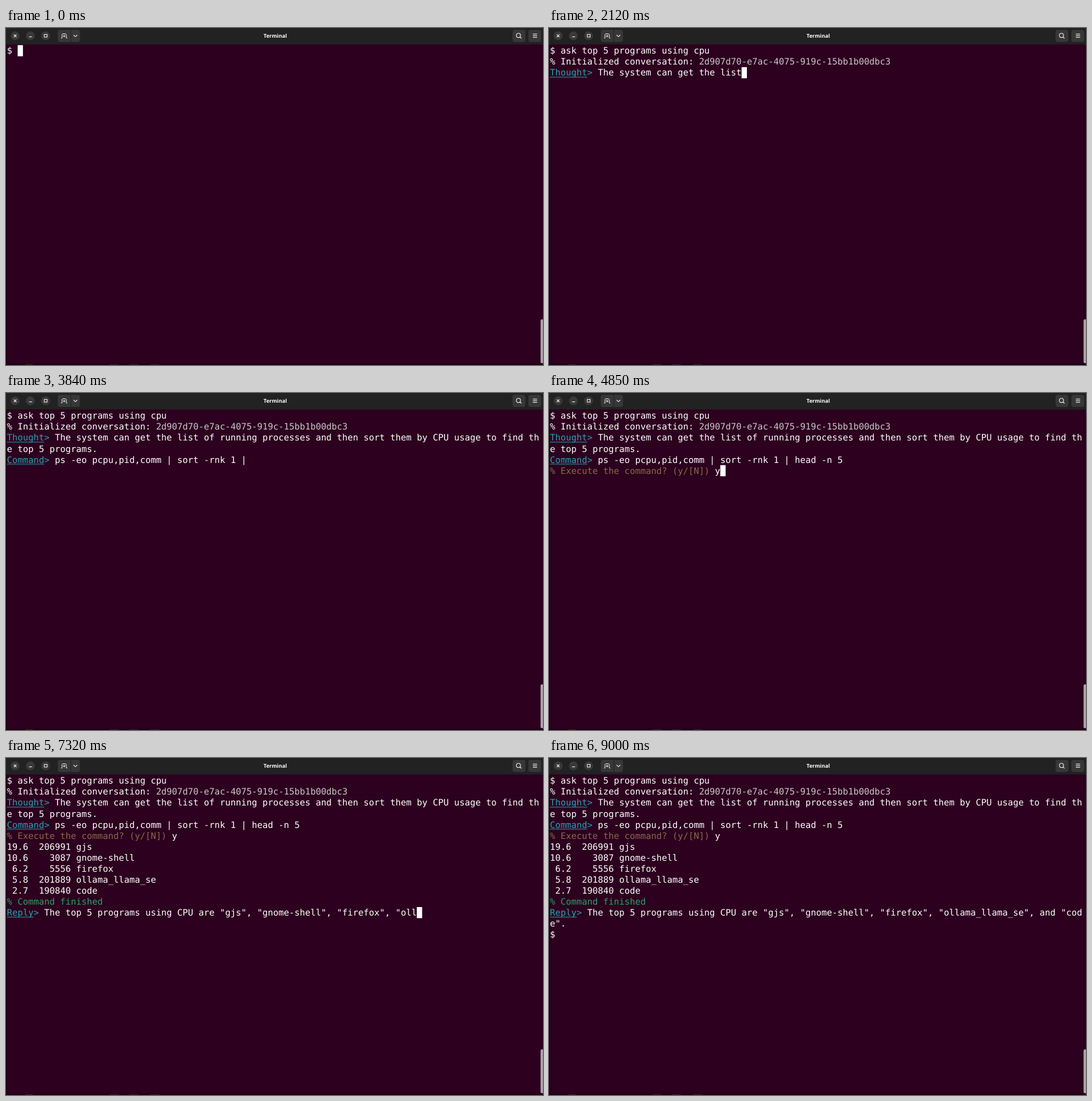
An HTML page with a canvas for the animation above (9840 ms loop, 882 px wide and 554 px high).

```html
<!DOCTYPE html>
<html lang="en">
<head>
<meta charset="utf-8">
<title>Terminal</title>
<style>
html, body { margin: 0; width: 100%; height: 100%; overflow: hidden; background: #2c001e; }
canvas { display: block; }
</style>
</head>
<body>
<canvas id="stage" width="882" height="554"></canvas>
<script>
const ctx = document.getElementById('stage').getContext('2d');
const LOOP = 9840, COLS = 100;
const CELL_W = 8.742, CELL_H = 18.07, LEFT = 1.6, TOP = 28.2, BASELINE = 14.1;

// Inline style codes: ^w white, ^d dim, ^u underlined label, ^c cyan, ^b brown, ^g green
const COLORS = { w: '#ffffff', d: '#cfc5cc', u: '#2aa1b3', c: '#2aa1b3', b: '#8c6849', g: '#26a269' };

const events = [];
const print = (time, text) => events.push({ time, text });

// Prints "~"-separated tokens evenly between two times
function stream(from, to, tokens) {
  const list = tokens.split('~');
  list.forEach((token, i) => print(from + (to - from) * i / (list.length - 1), token));
}

print(0, '$ ');
print(330, 'a');
print(490, 's');
print(930, 'k');
print(1200, ' ');
print(1420, 'top 5 programs using cpu');
print(1650, '\n% Initialized conversation: ^d2d907d70-e7ac-4075-919c-15bb1b00dbc3^w\n');
stream(1810, 2770, '^uThought~^c>^w~ The~ system~ can~ get~ the~ list~ of~ running~ processes~ and~ then~ sort' +
  '~ them~ by~ CPU~ usage~ to~ find~ the~ top~ ~5');
stream(2940, 3740, ' programs~.~\n^uCommand~^c>^w~ ps~ -~eo~ p~cpu~,~pid~,~comm~ |~ sort~ -~rn~k~ ');
stream(3800, 3840, '1~ |');
stream(3920, 4220, ' head~ -~n~ ~5~\n~^b% Execute the command? (y/[N])^w ');
print(4820, 'y');
print(4950, '\n19.6  206991 gjs\n10.6    3087 gnome-shell\n 6.2    5556 firefox\n' +
  ' 5.8  201889 ollama_llama_se\n 2.7  190840 code\n');
print(5850, '^g% Command finished^w\n');
stream(6250, 7320, '^uReply~^c>^w~ The~ top~ ~5~ programs~ using~ CPU~ are~ "~g~js~",~ "~gn~ome~-~shell~",' +
  '~ "~fire~fox~",~ "~oll');
stream(7350, 7790, 'ama~_~ll~ama~_se~",~ and~ "~code~".');
print(8150, '\n$ ');

// The cursor flips at each of these times, starting visible
const blinks = [2210, 2810, 3410, 4010, 4570, 4820, 5400, 6000, 6600, 7200, 7800, 8400, 9000];

function box(x, y, w, h, color, radius = 0) {
  ctx.fillStyle = color;
  ctx.beginPath();
  ctx.roundRect(x, y, w, h, radius);
  ctx.fill();
}

function line(points, width = 1.1) {
  ctx.strokeStyle = '#eeeeee';
  ctx.lineWidth = width;
  ctx.beginPath();
  points.forEach(([x, y], i) => i ? ctx.lineTo(x, y) : ctx.moveTo(x, y));
  ctx.stroke();
}

// Drawn at double size and halved, so glyphs keep fractional positions
function write(text, x, y, size, family, color) {
  ctx.save();
  ctx.translate(x, y);
  ctx.scale(0.5, 0.5);
  ctx.font = `${family.weight} ${size * 2}px ${family.name}`;
  ctx.textAlign = family.align;
  ctx.fillStyle = color;
  ctx.fillText(text, 0, 0);
  ctx.restore();
}

const MONO = { name: '"DejaVu Sans Mono", monospace', weight: 400, align: 'left' };
const TITLE = { name: '"Open Sans", "Noto Sans", sans-serif', weight: 700, align: 'center' };

function drawWindow() {
  box(0, 0, 882, 554, '#2c001e');
  box(0, 0, 882, 27, '#222222');
  box(0, 27, 1, 527, '#12000c');
  box(0, 552.5, 882, 1.5, '#12000c');
  box(32, 553, 12, 1, '#4a2414');
  for (const x of [170, 202, 237]) box(x, 553, 15, 1, '#2b2630');
  box(878, 479, 5, 72, '#aaa0a7', 2);

  for (const x of [15, 40, 65]) box(x - 7.3, 5.5, 14.6, 14.6, '#393939', 7.3);
  line([[12.8, 10.6], [17.2, 15]]);
  line([[17.2, 10.6], [12.8, 15]]);
  line([[37.8, 14.5], [42.8, 14.5]]);
  line([[63, 10.5], [67.5, 10.5], [67.5, 15], [63, 15], [63, 10]]);

  box(85, 3, 36.5, 20, '#373737', 4);
  box(106, 3, 1, 20, '#222222');
  line([[90.5, 16.5], [92, 16.5], [92, 10.5], [93, 9.5], [98, 9.5], [99, 10.5], [99, 16.5], [100.5, 16.5]], 1);
  line([[93.5, 13.3], [97.5, 13.3]], 1);
  line([[95.5, 11.3], [95.5, 15.3]], 1);
  line([[111, 11.5], [114, 14.3], [117, 11.5]]);

  box(832, 3, 21, 20, '#373737', 4);
  box(858, 3, 21, 20, '#373737', 4);
  ctx.beginPath();
  ctx.arc(841.7, 12.2, 3.4, 0, Math.PI * 2);
  ctx.stroke();
  line([[844.1, 14.6], [846.6, 17.1]], 1.3);
  for (const y of [10, 12.7, 15.4]) line([[865.3, y], [872.3, y]]);

  write('Terminal', 442.2, 16, 8.7, TITLE, '#ffffff');
}

function drawTerminal(time) {
  let row = 0, col = 0, style = 'w';
  const text = events.filter(e => e.time <= time).map(e => e.text).join('');
  for (let i = 0; i < text.length; i++) {
    const ch = text[i];
    if (ch === '^') { style = text[++i]; continue; }
    if (ch === '\n') { row++; col = 0; continue; }
    if (col === COLS) { row++; col = 0; }
    const x = LEFT + col * CELL_W, y = TOP + row * CELL_H;
    if (ch !== ' ') write(ch, x, y + BASELINE, 14.52, MONO, COLORS[style]);
    if (style === 'u') box(x, y + 15.9, CELL_W, 1, COLORS.u);
    col++;
  }
  const visible = blinks.filter(t => t <= time).length % 2 === 0;
  if (visible) box(LEFT + Math.min(col, COLS - 1) * CELL_W, TOP + row * CELL_H, CELL_W, CELL_H + 0.2, '#ffffff');
}

function frame(now) {
  drawWindow();
  drawTerminal(now % LOOP);
  requestAnimationFrame(frame);
}
ctx.textRendering = 'geometricPrecision';
frame(performance.now());
</script>
</body>
</html>
```
